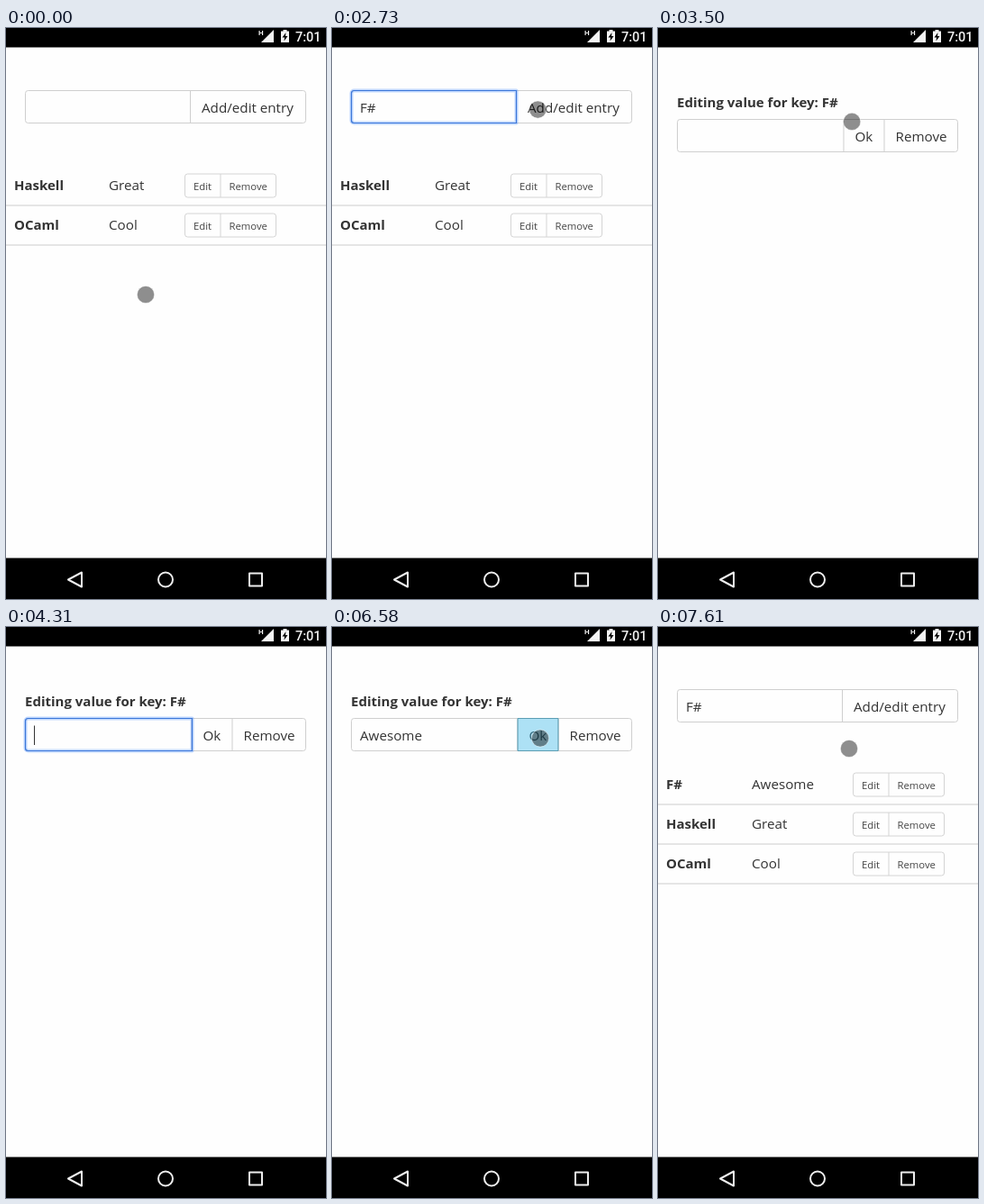
Recreate the animation shown at these times as an HTML page with a canvas. Size 355 by 634 pixels, loop 7750 ms.

```html
<!DOCTYPE html>
<html lang="en">
<head>
<meta charset="utf-8">
<title>Key and value list</title>
<style>
html, body { margin: 0; width: 100%; height: 100%; overflow: hidden; background: #fefefe; }
canvas { display: block; width: 355px; height: 634px; }
</style>
</head>
<body>
<canvas id="stage"></canvas>
<script>
const W = 355, H = 634, LOOP = 7750, BLINK = 480;
const SANS = '"Open Sans", "Noto Sans", sans-serif';
const BODY = `15.2px ${SANS}`, BOLD = `bold 15px ${SANS}`, SMALL = `11.3px ${SANS}`;
const canvas = document.getElementById('stage');
const ctx = canvas.getContext('2d');
const dpr = window.devicePixelRatio || 1;
canvas.width = W * dpr;
canvas.height = H * dpr;

// Touch pointer: start, end, then the two end points and the upward bow of the path.
const moves = [
  [190, 620, 155, 296, 152, 88, 0],
  [2410, 2900, 152, 88, 256, 91.5, 0],
  [3380, 3670, 256, 91.5, 146, 125, 0],
  [5810, 6130, 146, 125, 236, 123, 7],
  [6330, 6400, 236, 123, 231, 123.5, 0],
  [7220, 7610, 231, 123.5, 212, 135, 0]
];
const keyField = { text: 'F#', keys: [1670, 1900], focus: 810, blur: 2890 };
const valueField = { text: 'Awesome', keys: [4390, 4620, 4720, 4820, 4910, 5010, 5190], focus: 3850, blur: 6580 };

const clamp = v => Math.min(1, Math.max(0, v));
const progress = (t, from, to) => clamp((t - from) / (to - from));
const easeOut = p => 1 - (1 - p) ** 2;
const easeInOut = p => (1 - Math.cos(Math.PI * p)) / 2;
const between = (t, from, to) => t >= from && t < to;

function text(str, x, y, font = BODY, color = '#333') {
  ctx.font = font;
  ctx.fillStyle = color;
  ctx.fillText(str, x, y);
}

function line(x1, y1, x2, y2, color, width = 1) {
  ctx.strokeStyle = color;
  ctx.lineWidth = width;
  ctx.beginPath();
  ctx.moveTo(x1, y1);
  ctx.lineTo(x2, y2);
  ctx.stroke();
}

function roundBox(x, y, w, h, r, color, width = 1) {
  ctx.strokeStyle = color;
  ctx.lineWidth = width;
  ctx.beginPath();
  ctx.roundRect(x, y, w, h, r);
  ctx.stroke();
}

function polygon(points) {
  ctx.beginPath();
  points.forEach(([x, y]) => ctx.lineTo(x, y));
  ctx.closePath();
}

// A joined row of boxes; edges lists the x of every vertical border.
function group(edges, y, h, color = '#cfcfcf') {
  const left = edges[0], right = edges[edges.length - 1];
  roundBox(left, y, right - left, h, 3, color);
  edges.slice(1, -1).forEach(x => line(x, y, x, y + h, color));
}

function highlight(x, y, w, h) {
  ctx.fillStyle = 'rgba(51,181,229,.4)';
  ctx.fillRect(x, y, w, h);
  roundBox(x, y, w, h, 0, '#5b9db3');
}

function field(f, t, y, right) {
  const typed = f.keys.filter(k => t >= k);
  const value = f.text.slice(0, typed.length);
  text(value, 31, y + 24.5);
  if (!between(t, f.focus, f.blur)) return;
  const corners = [3, 0, 0, 3];
  roundBox(21.5, y, right - 21.5, 36, corners, 'rgba(77,144,254,.35)', 4);
  roundBox(21.5, y, right - 21.5, 36, corners, '#3d78d8', 1.2);
  const last = typed.length ? typed[typed.length - 1] : f.focus;
  if ((t - last) % (2 * BLINK) < BLINK) {
    const x = 31.5 + Math.floor(ctx.measureText(value).width);
    line(x, y + 8, x, y + 29.5, '#333');
  }
}

function listPage(t) {
  const added = t > 6580;
  const rows = [['Haskell', 'Great'], ['OCaml', 'Cool']];
  if (added) rows.unshift(['F#', 'Awesome']);
  group([21.5, 204.5, 332.5], 69.5, 36);
  text('Add/edit entry', 217, 94);
  if (between(t, 2890, 2990)) highlight(204.5, 69.5, 128, 36);
  field(keyField, t, 69.5, 204.5);
  const valueX = added ? 104 : 114, x = added ? 216.5 : 198.5;
  rows.forEach(([key, value], i) => {
    const y = 44 * i;
    text(key, 9, y + 180, BOLD);
    text(value, valueX, y + 180);
    group([x, x + 39.5, x + 101], y + 162, 26, '#d4d4d4');
    text('Edit', x + 9.5, y + 180, SMALL, '#444');
    text('Remove', x + 49, y + 180, SMALL, '#444');
    line(0, y + 197, W, y + 197, '#dcdcdc', 1.4);
  });
}

function editPage(t, offset) {
  ctx.save();
  ctx.translate(offset, 0);
  ctx.fillStyle = '#fefefe';
  ctx.fillRect(0, 0, W, H);
  text('Editing value for key: F#', 21, 88, BOLD);
  group([21.5, 206, 251, 332.5], 101.5, 36);
  text('Ok', 218.5, 126);
  text('Remove', 263.5, 126);
  if (between(t, 6580, 6660)) highlight(206, 101.5, 45, 36);
  field(valueField, t, 101.5, 206.5);
  ctx.restore();
}

function pointer(t) {
  if (between(t, 1260, 2410) || between(t, 4310, 5810)) return;
  const [from, to, x1, y1, x2, y2, bow] = moves.filter(m => t >= m[0]).pop() || moves[0];
  const p = easeInOut(progress(t, from, to));
  ctx.beginPath();
  ctx.arc(x1 + (x2 - x1) * p, y1 + (y2 - y1) * p - bow * Math.sin(Math.PI * p), 9.6, 0, 7);
  ctx.fillStyle = 'rgba(0,0,0,.44)';
  ctx.fill();
  ctx.strokeStyle = 'rgba(255,255,255,.45)';
  ctx.lineWidth = 1;
  ctx.stroke();
}

function systemBars() {
  ctx.fillStyle = '#000';
  ctx.fillRect(0, 0, W, 21.5);
  ctx.fillRect(0, 588.5, W, 45.5);

  ctx.fillStyle = '#f4f4f4';
  polygon([[283, 16], [297, 16], [297, 2]]);
  ctx.fill();
  ctx.fillRect(307.5, 2, 4, 2);
  ctx.fillRect(305, 3.5, 9, 12.5);
  ctx.fillStyle = '#000';
  polygon([[310.5, 5], [306.5, 10.5], [309, 10.5], [308.5, 14.5], [312.5, 9], [310, 9]]);
  ctx.fill();
  text('H', 280, 8, 'bold 8px Roboto, sans-serif', '#f4f4f4');
  text('7:01', 321, 14.5, '500 14.5px Roboto, sans-serif', '#f4f4f4');

  ctx.strokeStyle = '#eee';
  ctx.lineWidth = 2;
  ctx.lineJoin = 'round';
  polygon([[69, 612.5], [84, 604.5], [84, 620.5]]);
  ctx.stroke();
  ctx.beginPath();
  ctx.arc(177, 612.5, 8, 0, 7);
  ctx.stroke();
  ctx.strokeRect(270, 605.5, 14, 14);
}

function draw(t) {
  ctx.setTransform(dpr, 0, 0, dpr, 0, 0);
  ctx.fillStyle = '#fefefe';
  ctx.fillRect(0, 0, W, H);
  // How far the edit page covers the list.
  const cover = t < 6580
    ? easeOut(progress(t, 2990, 3250))
    : 1 - easeOut(progress(t, 6650, 6810));
  ctx.globalAlpha = clamp(1 - 1.14 * cover);
  if (ctx.globalAlpha > 0) listPage(t);
  ctx.globalAlpha = 1;
  if (cover > 0) editPage(t, W * (1 - cover));
  pointer(t);
  systemBars();
}

const start = performance.now();
function frame() {
  draw((performance.now() - start) % LOOP);
  requestAnimationFrame(frame);
}
frame();
</script>
</body>
</html>
```
